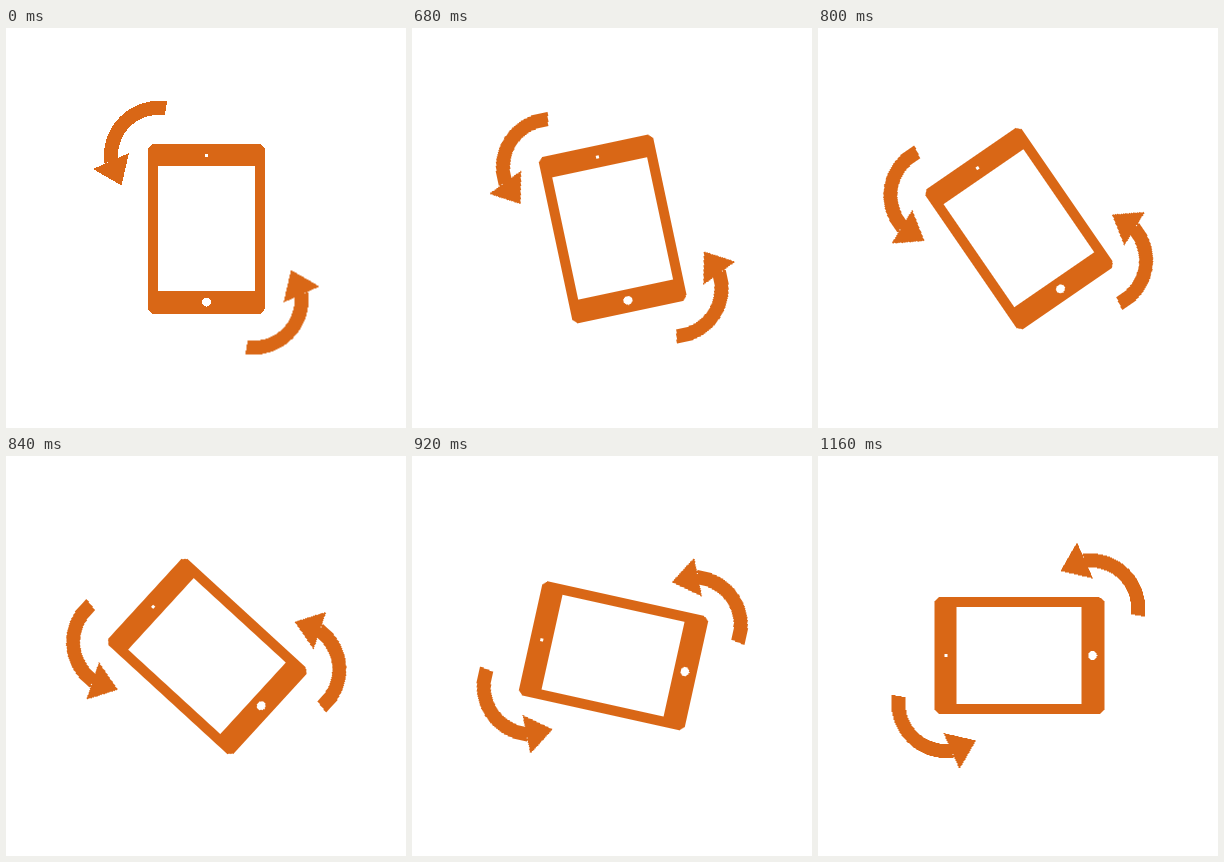
An HTML page for the animation above (2 s loop, 400 by 400 pixels).

```html
<!DOCTYPE html>
<html lang="en">
<head>
<meta charset="utf-8">
<title>Rotate device</title>
<style>
  html, body { margin: 0; width: 100%; height: 100%; overflow: hidden; background: #fff; }
  svg { display: block; width: 100vw; height: 100vh; shape-rendering: crispEdges; }
  .device {
    fill: #d96716;
    transform-box: view-box;
    transform-origin: 200.25px 199.75px;
    animation: turn 2s step-end infinite;
  }
  .arc { fill: none; stroke: #d96716; stroke-width: 14; }
  .hole { fill: #fff; }

  /* one pose every 40 ms: speed up, swing past the quarter turn, settle */
  @keyframes turn {
    0%   { transform: rotate(0deg); }
    30%  { transform: rotate(-4deg); }
    32%  { transform: rotate(-7.5deg); }
    34%  { transform: rotate(-12deg); }
    36%  { transform: rotate(-18deg); }
    38%  { transform: rotate(-25.5deg); }
    40%  { transform: rotate(-34.5deg); }
    42%  { transform: rotate(-47.5deg); }
    44%  { transform: rotate(-62.4deg); }
    46%  { transform: rotate(-77.5deg); }
    48%  { transform: rotate(-90.2deg); }
    50%  { transform: rotate(-95.8deg); }
    52%  { transform: rotate(-96.2deg); }
    54%  { transform: rotate(-93.2deg); }
    56%  { transform: rotate(-90.4deg); }
    58%, 100% { transform: rotate(-90deg); }
  }
</style>
</head>
<body>
<svg viewBox="0 0 400 400">
  <defs>
    <g id="arrow">
      <path class="arc" d="M160 80.3A48 48 0 0 0 105.3 134"/>
      <path d="M87 141L123 125L115.5 157.5Z"/>
    </g>
  </defs>
  <g class="device">
    <rect x="142" y="116" width="117" height="170" rx="7"/>
    <rect class="hole" x="152" y="138" width="97" height="125"/>
    <circle class="hole" cx="200.5" cy="127.5" r="1.5"/>
    <circle class="hole" cx="200.5" cy="274" r="4.5"/>
    <use href="#arrow"/>
    <use href="#arrow" transform="rotate(180 200.25 199.75)"/>
  </g>
</svg>
</body>
</html>
```
